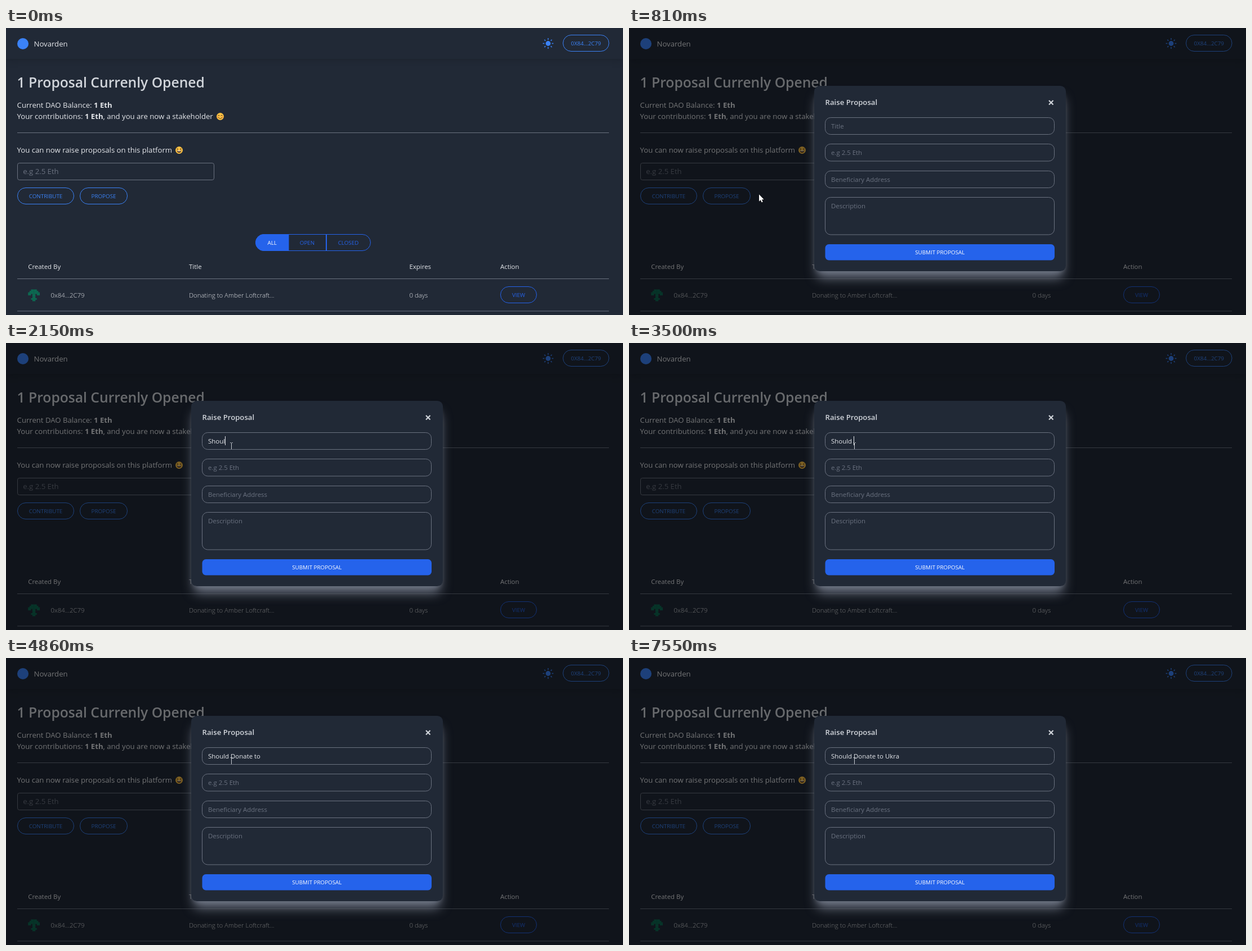
Recreate the animation shown at these times as an HTML page with a canvas. Size 1096 by 511 pixels, loop 8 s.

```html
<!DOCTYPE html>
<html lang="en">
<head>
<meta charset="utf-8">
<title>Raise Proposal</title>
<style>
  html, body { margin: 0; width: 100%; height: 100%; overflow: hidden; background: #212936; }
  canvas { display: block; }
</style>
</head>
<body>
<canvas id="stage" width="1096" height="511"></canvas>
<script>
const ctx = document.getElementById('stage').getContext('2d');
const LOOP = 8000;
const W = 1096, H = 511;
const BG = '#212936', TEXT = '#d1d5db', LIGHT = '#e5e7eb', GRAY = '#6b7280';
const BLUE = '#3b82f6', DEEP = '#2563eb';
const XS = 9.8, SM = 11.43, MD = 13.15, XL = 24.65;

// Contents of the title field from each time on
const TYPING = [
  { at: 1480, text: '', caret: true },
  { at: 2150, text: 'Shoul', caret: true },
  { at: 2830, text: 'Should', caret: false },
  { at: 3500, text: 'Should ', caret: true },
  { at: 4180, text: 'Should Dona', caret: true },
  { at: 4860, text: 'Should Donate to', caret: false },
  { at: 6200, text: 'Should Donate to Ukrain', caret: true },
  { at: 6870, text: 'Should Donate to Ukra', caret: true },
  { at: 7550, text: 'Should Donate to Ukra', caret: false }
];

// Draws text and returns the x where it ends
function text(str, x, y, size, color = TEXT, weight = 400, align = 'left') {
  ctx.font = `${weight} ${size}px "Open Sans", sans-serif`;
  ctx.textAlign = align;
  ctx.fillStyle = color;
  ctx.fillText(str, x, y);
  return x + ctx.measureText(str).width;
}

function box(x, y, w, h, r, stroke, fill) {
  ctx.beginPath();
  ctx.roundRect(x, y, w, h, r);
  if (fill) { ctx.fillStyle = fill; ctx.fill(); }
  if (stroke) { ctx.strokeStyle = stroke; ctx.lineWidth = 1; ctx.stroke(); }
}

function rect(x, y, w, h, color) {
  ctx.fillStyle = color;
  ctx.fillRect(x, y, w, h);
}

function disc(x, y, r, color) {
  ctx.beginPath();
  ctx.arc(x, y, r, 0, 7);
  ctx.fillStyle = color;
  ctx.fill();
}

function line(color, width, ...pts) {
  ctx.beginPath();
  for (const [x, y] of pts) ctx.lineTo(x, y);
  ctx.strokeStyle = color;
  ctx.lineWidth = width;
  ctx.stroke();
}

function shadow(x, y, w, h, r, dy, blur, spread, color) {
  ctx.save();
  ctx.shadowColor = color;
  ctx.shadowBlur = blur;
  ctx.shadowOffsetY = dy;
  box(x - spread, y - spread, w + 2 * spread, h + 2 * spread, r, null, BG);
  ctx.restore();
}

function pill(label, x, y, w, color = BLUE) {
  box(x, y, w, 29, 14.5, color);
  text(label, x + w / 2, y + 18.5, XS, color, 500, 'center');
}

function sun(x, y) {
  disc(x, y, 4.4, BLUE);
  for (let i = 0; i < 8; i++) {
    const c = Math.cos(i * Math.PI / 4), s = Math.sin(i * Math.PI / 4);
    line(BLUE, 1.5, [x + c * 6.6, y + s * 6.6], [x + c * 9.4, y + s * 9.4]);
  }
}

function smiley(x, y, laughing) {
  const ink = '#5a3a1c';
  disc(x, y, 6.5, '#fbc245');
  if (laughing) {
    for (const d of [-1, 1])
      line(ink, 1, [x + d * 4, y - 3.4], [x + d * 1.7, y - 1.8], [x + d * 4, y - 0.6]);
    ctx.beginPath();
    ctx.arc(x, y + 0.8, 3.8, 0, Math.PI);
    ctx.fillStyle = ink;
    ctx.fill();
    rect(x - 2.8, y + 0.8, 5.6, 1.1, '#fff');
  } else {
    for (const d of [-1, 1]) {
      disc(x + d * 4.2, y + 1.4, 1.5, '#f59a45');
      ctx.beginPath();
      ctx.arc(x + d * 2.6, y - 0.9, 1.3, Math.PI, 0);
      ctx.strokeStyle = ink;
      ctx.lineWidth = 1;
      ctx.stroke();
    }
    ctx.beginPath();
    ctx.arc(x, y + 0.6, 3.2, 0.3, Math.PI - 0.3);
    ctx.stroke();
  }
}

// Mirrored block avatar: [row, first column, width] on the left half
function avatar(x, y) {
  const u = 2.6, rows = [[0, 2, 2], [1, 1, 3], [2, 0, 4], [3, 0, 2], [3, 3, 1],
    [4, 3, 1], [5, 3, 1], [6, 2, 2], [7, 3, 1]];
  for (const [r, c, n] of rows) {
    rect(x + c * u, y + r * u, n * u + 0.1, u + 0.1, '#0c6b52');
    rect(x + (8 - c - n) * u, y + r * u, n * u, u + 0.1, '#0c6b52');
  }
}

function drawHeader() {
  shadow(0, 0, W, 55, 0, 8.2, 12.2, -2.4, 'rgba(0,0,0,.1)');
  shadow(0, 0, W, 55, 0, 3.3, 4.9, -3.3, 'rgba(0,0,0,.1)');
  rect(0, 0, W, 55, BG);
  disc(30, 28, 10, BLUE);
  text('Novarden', 49.5, 33, MD, LIGHT);
  sun(963, 27.5);
  pill('0X84...2C79', 989.5, 12.5, 81.5);
}

function drawFilters() {
  box(443.5, 367.5, 204, 29, 14.5, DEEP);
  box(443.5, 367.5, 58.5, 29, [14.5, 0, 0, 14.5], DEEP, DEEP);
  rect(568, 367, 2, 30, DEEP);
  text('ALL', 472.7, 386, XS, '#fff', 500, 'center');
  text('OPEN', 535, 386, XS, DEEP, 500, 'center');
  text('CLOSED', 608, 386, XS, DEEP, 500, 'center');
}

function drawTable() {
  const cols = { 'Created By': 39.2, Title: 325, Expires: 716.5, Action: 878 };
  for (const name in cols) text(name, cols[name], 429, SM, LIGHT, 500);
  rect(20, 446, 1051, 1, GRAY);
  avatar(39.2, 465.5);
  text('0x84...2C79', 79.5, 480, SM, LIGHT, 300);
  text('Donating to Amber Loftcraft...', 325, 480, SM, LIGHT, 300);
  text('0 days', 716.5, 480, SM, LIGHT, 300);
  pill('VIEW', 878.5, 460.5, 64, DEEP);
  rect(20, 503.5, 1051, 1, GRAY);
}

function drawPage() {
  rect(0, 0, W, H, BG);
  drawHeader();
  text('1 Proposal Currenly Opened', 19.6, 106, XL, TEXT, 600);
  let x = text('Current DAO Balance: ', 19.6, 142, MD, LIGHT);
  text('1 Eth', x, 142, MD, LIGHT, 700);
  x = text('Your contributions: ', 19.6, 162, MD, LIGHT);
  x = text('1 Eth', x, 162, MD, LIGHT, 700);
  text(', and you are now a stakeholder', x, 162, MD, LIGHT);
  smiley(380.5, 157.5, false);
  rect(20, 186, 1051, 1, GRAY);
  text('You can now raise proposals on this platform', 19.6, 222, MD, LIGHT);
  smiley(307.5, 217.5, true);
  box(20.5, 240.5, 349, 30, 3.3, GRAY);
  text('e.g 2.5 Eth', 30.2, 260, MD, GRAY);
  pill('CONTRIBUTE', 20.5, 284.5, 100);
  pill('PROPOSE', 131.5, 284.5, 84);
  drawFilters();
  drawTable();
}

function drawModal(field) {
  rect(0, 0, W, H, 'rgba(0,0,0,.5)');
  const frame = [329, 103, 447, 330, 9.8];
  shadow(...frame, 16.3, 20.4, -4.1, GRAY);
  shadow(...frame, 6.5, 8.2, -4.9, GRAY);
  box(...frame, null, BG);
  text('Raise Proposal', 348.6, 137, MD, TEXT, 600);
  line(TEXT, 2.2, [746, 129], [753.5, 136.5]);
  line(TEXT, 2.2, [753.5, 129], [746, 136.5]);

  const fields = [
    [159.5, 30, 179, field && field.text ? '' : 'Title'],
    [206.5, 30.5, 226, 'e.g 2.5 Eth'],
    [254.5, 30, 274, 'Beneficiary Address'],
    [301.5, 66.5, 321, 'Description']
  ];
  for (const [y, h, base, hint] of fields) {
    box(348.5, y, 407, h, 9.8, GRAY);
    text(hint, 359, base, SM, GRAY);
  }
  box(348.5, 385, 407.5, 28.5, 6.5, null, DEEP);
  text('SUBMIT PROPOSAL', 552.3, 403, XS, '#fff', 500, 'center');

  if (!field) return;
  const end = text(field.text, 359, 179, SM, LIGHT);
  if (field.caret) rect(Math.floor(end), field.text ? 166 : 167, 1, 16, LIGHT);
}

function drawArrow(x, y) {
  ctx.save();
  ctx.translate(x, y);
  ctx.beginPath();
  for (const [px, py] of [[0, 0], [0, 12.5], [2.8, 10], [4.7, 14.2], [6.7, 13.3], [4.9, 9.2], [8.6, 9]])
    ctx.lineTo(px, py);
  ctx.closePath();
  ctx.lineJoin = 'round';
  ctx.strokeStyle = '#0a0c10';
  ctx.lineWidth = 1.4;
  ctx.stroke();
  ctx.fillStyle = '#fff';
  ctx.fill();
  ctx.restore();
}

function drawBeam(x, y) {
  rect(x, y + 1, 1, 11, '#c8ccd2');
  rect(x - 2, y, 2, 1, '#a4a9b1');
  rect(x + 1, y, 2, 1, '#a4a9b1');
}

function drawTooltip() {
  box(1049.5, 491.5, 34, 19, 0, '#8d8d8d', '#c9cacb');
  text('Pause', 1066.5, 508, 9.6, '#222', 400, 'center');
}

function draw(t) {
  drawPage();
  if (t >= 810) {
    const field = TYPING.filter(s => t >= s.at).pop();
    drawModal(field);
    if (field) drawBeam(400, 177);
    else drawArrow(231, 296.3);
  } else if (t >= 620) {
    drawArrow(430.6, 264.6);
    drawTooltip();
  }
}

const start = performance.now();
function tick() {
  draw((performance.now() - start) % LOOP);
  requestAnimationFrame(tick);
}
tick();
</script>
</body>
</html>
```
